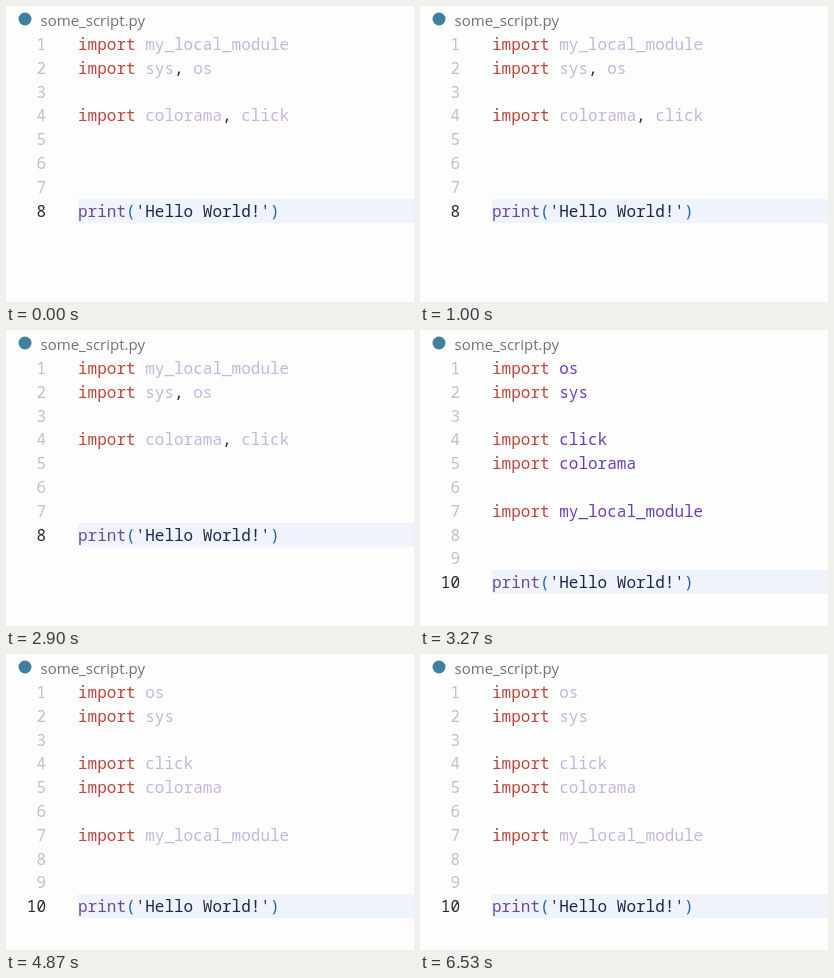
Recreate the animation shown at these times as an HTML page with a canvas. Size 408 by 296 pixels, loop 6.56 s.

```html
<!DOCTYPE html>
<html lang="en">
<head>
<meta charset="utf-8">
<title>Import sorting</title>
<style>
  html, body { margin: 0; width: 100%; height: 100%; overflow: hidden; background: #fdfdfd; }
  canvas { display: block; }
</style>
</head>
<body>
<canvas id="stage" width="408" height="296"></canvas>
<script>
const ctx = document.getElementById('stage').getContext('2d');

const LOOP = 6560, SORT_AT = 3000, DIM_AT = 4000;
const LINE = 23.8, FIRST_BASELINE = 44, CHAR = 9.6, CODE_X = 72, NUMBER_RIGHT = 40;
const CODE_FONT = '16px "Noto Sans Mono", monospace';
const TITLE_FONT = '15px "Open Sans", sans-serif';

const colors = {
  back: '#fdfdfd', highlight: '#eff4fc', title: '#6c717c', icon: '#417f9f',
  keyword: '#c0453c', name: '#6a3fb5', unused: '#c5b5de', call: '#694b9c',
  plain: '#24292e', string: '#1a2748', paren: '#1f63b0',
  number: '#c3c1bd', active: '#24292e'
};

const unsorted = ['my_local_module', 'sys, os', '', 'colorama, click', '', '', ''];
const sorted = ['os', 'sys', '', 'click', 'colorama', '', 'my_local_module', '', ''];

const baseline = row => Math.round(FIRST_BASELINE + (row - 1) * LINE);

function text(str, x, y, color) {
  ctx.fillStyle = color;
  ctx.fillText(str, x, y);
}

// Draws [string, color] pairs on the character grid.
function drawTokens(tokens, y) {
  let column = 0;
  for (const [str, color] of tokens) {
    text(str, CODE_X + column * CHAR, y, color);
    column += str.length;
  }
}

function importTokens(names, nameColor) {
  const parts = names.split(/(, )/).map(p => [p, p === ', ' ? colors.plain : nameColor]);
  return [['import ', colors.keyword], ...parts];
}

const printTokens = [
  ['print', colors.call], ['(', colors.paren],
  ["'Hello World!'", colors.string], [')', colors.paren]
];

function drawHeader() {
  ctx.fillStyle = colors.icon;
  ctx.beginPath();
  ctx.arc(19, 13, 6.5, 0, Math.PI * 2);
  ctx.fill();
  ctx.font = TITLE_FONT;
  text('some_script.py', 34.5, 20, colors.title);
}

function draw(time) {
  const imports = time < SORT_AT ? unsorted : sorted;
  const used = time >= SORT_AT && time < DIM_AT;
  const count = imports.length + 1;

  ctx.fillStyle = colors.back;
  ctx.fillRect(0, 0, 408, 296);
  ctx.fillStyle = colors.highlight;
  ctx.fillRect(CODE_X, baseline(count) - 18, 408 - CODE_X, 24);
  drawHeader();

  ctx.font = CODE_FONT;
  for (let row = 1; row <= count; row++) {
    const y = baseline(row);
    const number = String(row);
    text(number, NUMBER_RIGHT - number.length * CHAR, y, row === count ? colors.active : colors.number);
    const names = imports[row - 1];
    if (row === count) drawTokens(printTokens, y);
    else if (names) drawTokens(importTokens(names, used ? colors.name : colors.unused), y);
  }
}

const start = performance.now();
function tick() {
  draw((performance.now() - start) % LOOP);
  requestAnimationFrame(tick);
}
tick();
</script>
</body>
</html>
```
